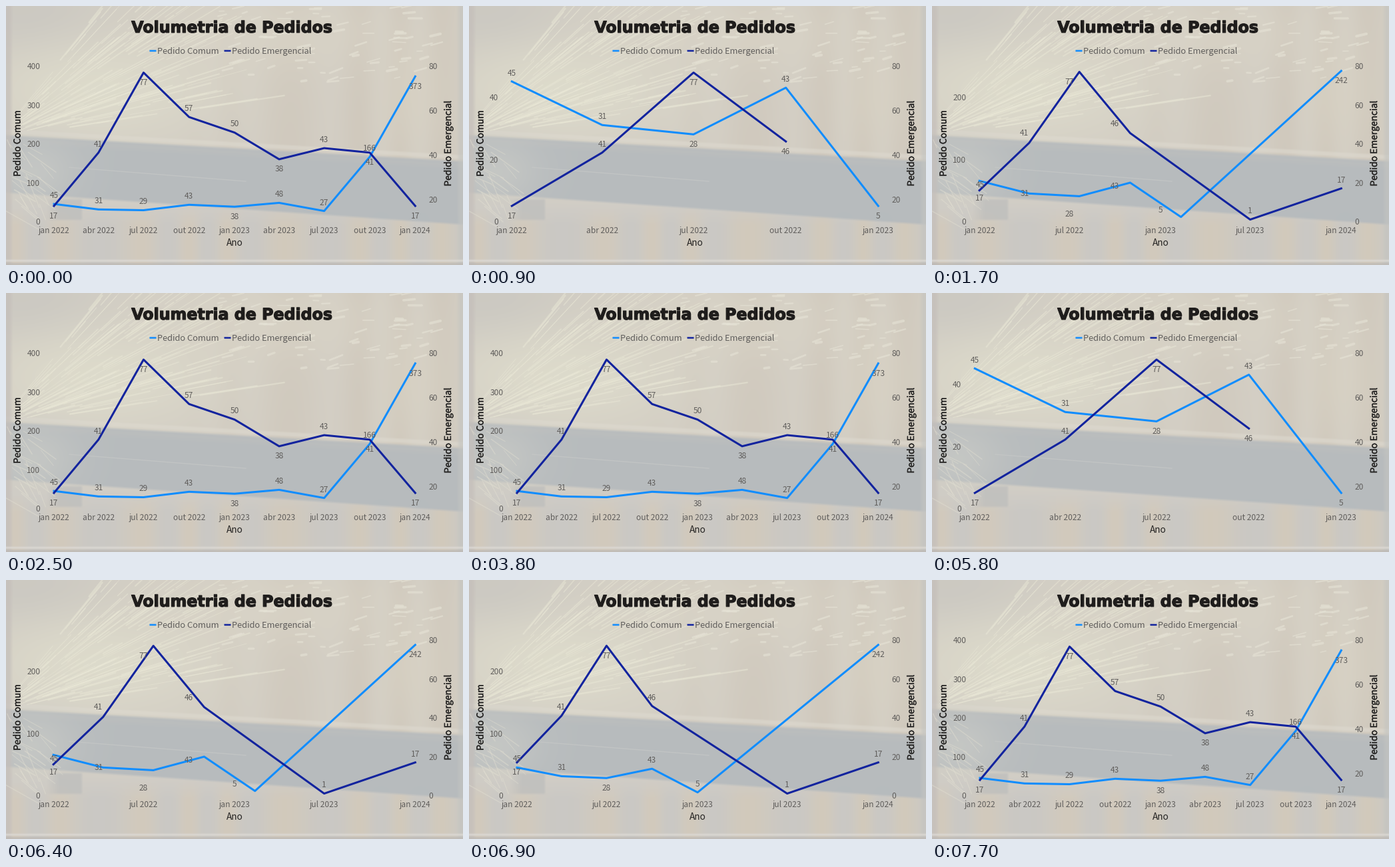
Write a matplotlib script that moves like this. It is 686 px wide and 390 px high and loops after 8000 ms.

```python
import numpy as np
import matplotlib.pyplot as plt
from matplotlib.animation import FuncAnimation
from matplotlib.collections import LineCollection
from matplotlib.patheffects import withStroke

W, H, DPI = 686, 390, 100
STEP_MS, N_FRAMES = 100, 80
LIGHT, NAVY = "#118DFF", "#12239E"
GREY, INK = "#605E5C", "#252423"
SANS = "Noto Sans CJK JP"

BOTTOM, TOP, RIGHT = 324.5, 90.2, 614.3
GAP_ABOVE, GAP_BELOW = 13.5, 14.3
EASE_MS = 575

DAYS = [0, 90, 181, 273, 365, 455, 546, 638, 730]
MONTHS = ["jan", "abr", "jul", "out"]

fig = plt.figure(figsize=(W / DPI, H / DPI), dpi=DPI)
ax = fig.add_axes([0, 0, 1, 1])
ax.set_xlim(0, W)
ax.set_ylim(H, 0)
ax.axis("off")


def text(x, y, s, size=12, color=GREY, ha="center", **kw):
    """Text whose capitals are centred on y; size in pixels."""
    return ax.text(x, y + 0.365 * size, s, fontsize=size * 72 / DPI, color=color,
                   ha=ha, va="baseline", family=kw.pop("family", SANS), **kw)


# ---------- backdrop ----------

def draw_backdrop():
    xs, ys = np.meshgrid(np.arange(W) + 0.5, np.arange(H) + 0.5)
    img = np.ones((H, W, 3)) * np.array([211, 206, 196])

    def mix(color, weight):
        img[:] += (np.array(color) - img) * np.clip(weight, 0, 1)[..., None]

    def blob(cx, cy, rx, ry):
        return np.exp(-((xs - cx) / rx) ** 2 - ((ys - cy) / ry) ** 2)

    def band(top, bottom, soft=2.0):
        return np.clip((ys - top) / soft, 0, 1) * np.clip((bottom - ys) / soft, 0, 1)

    # wall with vertical stripes
    stripes = 0.5 + 0.5 * np.sin(xs / 13 + 1.6 * np.sin(xs / 47))
    mix((204, 195, 182), 0.5 * stripes * np.clip((xs - 250) / 200, 0, 1))
    mix((217, 211, 196), 0.6 * blob(610, 130, 60, 90))
    mix((199, 197, 192), 0.7 * blob(40, 20, 120, 60))
    # glow of the sparks
    mix((222, 220, 204), 0.9 * blob(140, 125, 170, 75))
    mix((219, 214, 200), 0.6 * blob(400, 40, 190, 60))
    # floor
    mix((207, 204, 199), 0.75 * np.clip((ys - 285) / 20, 0, 1))
    mix((211, 200, 182), 0.6 * stripes * np.clip((ys - 300) / 30, 0, 1))
    mix((196, 196, 194), 0.5 * (1 - stripes) * np.clip((ys - 300) / 30, 0, 1))
    # beam
    upper = 193 + xs * 0.057
    lower = 283 + xs * 0.07
    mix((221, 217, 207), 0.6 * band(upper - 9, upper, 3))
    mix((181, 186, 189), 0.92 * band(upper, lower, 4))
    mix((190, 191, 190), 0.5 * band(upper, upper + 16, 8))
    mix((203, 204, 199), 0.65 * blob(40, 250, 65, 50))
    mix((188, 189, 188), 0.7 * band(289 + xs * 0, 324, 4)
        * np.clip((xs - 60) / 20, 0, 1) * np.clip((116 - xs) / 4, 0, 1))
    # border
    mix((196, 190, 186), 0.7 * np.clip((11 - xs) / 6, 0, 1))
    mix((195, 196, 193), 0.6 * np.clip((xs - 676) / 6, 0, 1))
    mix((220, 217, 212), 0.8 * band(381 + xs * 0, 386, 2))
    mix((188, 184, 180), 0.7 * np.clip((ys - 386) / 2, 0, 1))
    ax.imshow(np.clip(img / 255, 0, 1), extent=(0, W, H, 0), zorder=0,
              interpolation="nearest", aspect="auto")

    rng = np.random.default_rng(8)

    def streaks(start, angle, length, color, width, alpha):
        end = start + np.stack([np.cos(angle), -np.sin(angle)], 1) * length[:, None]
        ax.add_collection(LineCollection(np.stack([start, end], 1), colors=color,
                                         linewidths=width, alpha=alpha, zorder=1,
                                         capstyle="round"))

    # long rays fanning out to the upper right
    n = 150
    angle = np.radians(rng.uniform(8, 52, n))
    near = rng.uniform(30, 330, n)
    start = np.stack([-15 + near * np.cos(angle), 200 - near * np.sin(angle)], 1)
    streaks(start, angle, rng.uniform(25, 130, n), "#E9E7D6",
            rng.uniform(0.5, 1.8, n), 0.5)
    # short dashes further away
    n = 75
    start = np.stack([rng.uniform(300, 640, n), rng.uniform(2, 115, n)], 1)
    streaks(start, np.radians(rng.uniform(-4, 22, n)), rng.uniform(6, 22, n),
            "#E6E3D6", rng.uniform(1, 3, n), 0.6)
    # sparks falling at the lower left
    n = 26
    start = np.stack([rng.uniform(0, 60, n), rng.uniform(200, 320, n)], 1)
    streaks(start, np.radians(rng.uniform(-70, -20, n)), rng.uniform(12, 60, n),
            "#E2DFD2", rng.uniform(0.6, 1.4, n), 0.45)
    ax.plot([95, 360], [243, 264], color="#C6C8C7", lw=1, alpha=0.7, zorder=1)


# ---------- chart states ----------

class State:
    """One filter of the chart; marks say where labels go: a above, b below."""

    def __init__(self, days, left_max, left_step, right_min, light, navy,
                 x0=72, tick_every=1):
        self.x0, self.days = x0, days
        self.left_max, self.left_step = left_max, left_step
        self.right_min = right_min
        self.ticks = [q for q in range(0, 9, tick_every) if DAYS[q] <= days]
        self.light = self.place(light, self.left_y)
        self.navy = self.place(navy, self.right_y)

    def x(self, q):
        return self.x0 + (RIGHT - self.x0) * DAYS[q] / self.days

    def left_y(self, v):
        return BOTTOM - (BOTTOM - TOP) * v / self.left_max

    def right_y(self, v):
        return BOTTOM - (BOTTOM - TOP) * (v - self.right_min) / (80 - self.right_min)

    def place(self, series, to_y):
        values, marks, quarters = series
        return {q: (self.x(q), to_y(v), v, m)
                for q, v, m in zip(quarters, values, marks)}


ALL = range(9)
FULL = State(730, 400, 100, 10,
             ([45, 31, 29, 43, 38, 48, 27, 166, 373], "aaaabaaab", ALL),
             ([17, 41, 77, 57, 50, 38, 43, 41, 17], "babaababb", ALL))
WIDE = State(730, 200, 50, 10,
             ([45, 31, 29, 43, 38, 48, 27, 166, 131], "aabababab", ALL),
             ([17, 41, 77, 57, 50, 38, 42, 41], "babaaaab", ALL))
SHORT = State(365, 50, 20, 10,
              ([45, 31, 28, 43, 5], "aabab", ALL),
              ([17, 41, 77, 46], "babb", ALL), x0=64.3)
SPARSE = State(730, 250, 100, 0,
               ([45, 31, 28, 43, 5, 242], "aabaab", [0, 1, 2, 3, 4, 8]),
               ([17, 41, 77, 46, 1, 17], "babaaa", [0, 1, 2, 3, 6, 8]),
               tick_every=2)

SCHEDULE = [(-1000, FULL), (300, SHORT), (1300, SPARSE), (1900, FULL),
            (4400, WIDE), (5200, SHORT), (6000, SPARSE), (7100, FULL)]


def ease(t):
    t = min(max(t, 0), 1)
    return 4 * t ** 3 if t < 0.5 else 1 - 4 * (1 - t) ** 3


def blend(old, new, k):
    """Shared points glide from their old place, new ones are simply there."""
    pts = []
    for q, (x, y, *_) in new.items():
        ox, oy = old[q][:2] if q in old else (x, y)
        pts.append((ox + (x - ox) * k, oy + (y - oy) * k))
    return np.array(pts).T


# ---------- fixed parts ----------

draw_backdrop()
text(339.3, 31.3, "Volumetria de Pedidos", 23.7, "#1F1D1C", family="DejaVu Sans",
     weight="bold", path_effects=[withStroke(linewidth=0.9, foreground="#1F1D1C")])
for x, color, name in [(215, LIGHT, "Pedido Comum"), (327, NAVY, "Pedido Emergencial")]:
    ax.plot([x, x + 10], [66.5, 66.5], color=color, lw=1.8, solid_capstyle="butt")
    text(x + 12, 67, name, 12.9, ha="left")
for x, name in [(17.5, "Pedido Comum"), (664, "Pedido Emergencial")]:
    ax.text(x, 207, name, fontsize=13.8 * 72 / DPI, color=INK, family=SANS,
            rotation=90, ha="center", va="center",
            path_effects=[withStroke(linewidth=0.25, foreground=INK)])

light_line, = ax.plot([], [], color=LIGHT, lw=2.2, solid_joinstyle="round", zorder=3)
navy_line, = ax.plot([], [], color=NAVY, lw=2.2, solid_joinstyle="round", zorder=4)
labels = []


def draw_labels(s):
    while labels:
        labels.pop().remove()
    for v in range(0, s.left_max + 1, s.left_step):
        labels.append(text(s.x0 - 20.5, s.left_y(v) + 0.4, str(v), ha="right"))
    for v in range(0 if s.right_min == 0 else 20, 81, 20):
        labels.append(text(634.5, s.right_y(v) + 0.4, str(v), ha="left"))
    for q in s.ticks:
        labels.append(text(s.x(q), 338, f"{MONTHS[q % 4]} {2022 + q // 4}"))
    labels.append(text((s.x0 + RIGHT) / 2, 356.5, "Ano", 13.6, INK))
    for series in (s.light, s.navy):
        for x, y, v, mark in series.values():
            dy = -GAP_ABOVE if mark == "a" else GAP_BELOW
            labels.append(text(x, y + dy, str(v), zorder=5))


def update(frame):
    now = frame * STEP_MS
    i = max(j for j, (start, _) in enumerate(SCHEDULE) if start <= now)
    start, state = SCHEDULE[i]
    before = SCHEDULE[max(i - 1, 0)][1]
    k = ease((now - start) / EASE_MS)
    light_line.set_data(*blend(before.light, state.light, k))
    navy_line.set_data(*blend(before.navy, state.navy, k))
    draw_labels(state)
    return [light_line, navy_line, *labels]


anim = FuncAnimation(fig, update, frames=N_FRAMES, init_func=lambda: update(0),
                     interval=STEP_MS, repeat=True, repeat_delay=0, blit=False)
plt.show()
```
